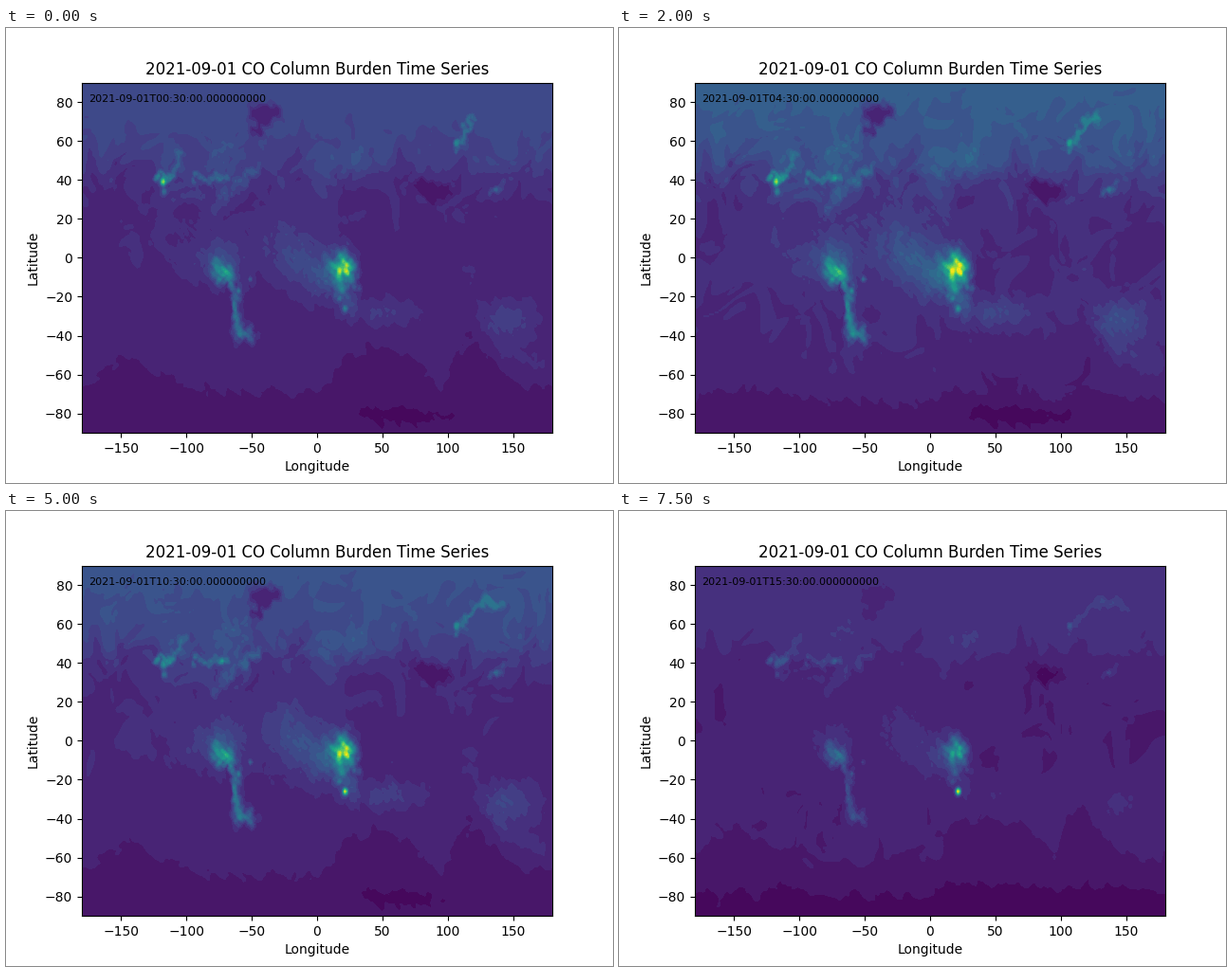
These frames come from a looping animation (640 by 480 pixels, 8000 ms). A matplotlib script:

```python
import numpy as np
import matplotlib.pyplot as plt
from matplotlib.animation import FuncAnimation

HOURS = 16
BANDS = 25
X, Y = np.meshgrid(np.linspace(-180, 180, 289), np.linspace(-90, 90, 181))


def waves(x, y, seed, n, lo, hi):
    """Sum of n random plane waves, periodic in longitude, unit variance."""
    rng = np.random.default_rng(seed)
    out = np.zeros_like(x)
    for _ in range(n):
        k = rng.integers(lo, hi + 1)
        m = rng.uniform(-1.5, 1.5) * hi
        out += np.cos(np.radians(k * x + m * y) + rng.uniform(0, 2 * np.pi))
    return out / np.sqrt(n / 2)


def swirl(x, y, seed):
    u = x + 8 * waves(x, y, seed, 6, 2, 8)
    v = y + 5 * waves(x, y, seed + 1, 6, 2, 8)
    return 0.75 * waves(u, v, seed + 2, 8, 3, 12) + 0.4 * waves(u, v, seed + 3, 9, 10, 28)


# Ragged coordinates give plumes an uneven outline
PX = X + 1.3 * waves(X, Y, 11, 8, 8, 30) + 0.5 * waves(X, Y, 12, 8, 30, 70)
PY = Y + 1.0 * waves(X, Y, 13, 8, 8, 30) + 0.5 * waves(X, Y, 14, 8, 30, 70)
GRAIN = waves(X, Y, 15, 10, 20, 70)


def blob(x, y, sx, sy, amp=1.0, power=2, gx=PX, gy=PY):
    r2 = ((gx - x) / sx) ** 2 + ((gy - y) / sy) ** 2
    return amp * np.exp(-r2 ** (power / 2))


def spot(x, y, size, amp):
    return blob(x, y, size, size, amp, gx=X, gy=Y)


def streak(points, width, amp):
    dist = np.full_like(X, 1e9)
    for (x0, y0), (x1, y1) in zip(points, points[1:]):
        dx, dy = x1 - x0, y1 - y0
        s = np.clip(((PX - x0) * dx + (PY - y0) * dy) / (dx * dx + dy * dy), 0, 1)
        dist = np.minimum(dist, np.hypot(PX - x0 - s * dx, PY - y0 - s * dy))
    return amp * np.exp(-(dist / width) ** 2)


def ease(v):
    return 1 / (1 + np.exp(-np.clip(v, -40, 40)))


# Clean southern air lies poleward of this line
FRONT = [(-180, -63), (-148, -50), (-130, -57), (-85, -68), (-20, -70), (5, -68),
         (20, -52), (45, -42), (70, -48), (88, -63), (95, -68), (103, -50),
         (116, -34), (128, -42), (145, -62), (160, -66), (180, -63)]

HAZE = [(-75, 12, 65, 26, .7), (-25, 5, 22, 18, .8), (20, 20, 45, 14, .45),
        (-72, -2, 15, 11, 2.4), (-95, -3, 14, 9, .6), (-70, 45, 35, 11, 1.0),
        (-110, 45, 14, 9, 1.0), (8, 47, 12, 6, 1.3), (30, 50, 9, 7, 2.0),
        (50, -28, 28, 7, 1.5), (148, -33, 20, 11, 1.7), (143, -29, 9, 5, .7),
        (105, 25, 14, 10, .5), (140, 50, 20, 9, .6)]

AFRICA = [(5, -8, 20, 12, 3), (-18, 3, 15, 12, 1.3), (18, -6, 10, 8.5, 6.5),
          (22, -5, 6, 6, 4.5), (18, -16, 4, 5, 4), (22, -6, 1.9, 1.9, 4),
          (25, -24, 7, 6, 2)]


def africa_fires():
    rng = np.random.default_rng(4)
    out = 0
    for _ in range(22):
        out = out + spot(rng.normal(20, 5.5), rng.normal(-7, 4.5), 1.4, rng.uniform(1.5, 4))
    return out


def steady_field():
    lons, lats = zip(*FRONT)
    d = PY - np.interp(X, lons, lats)
    v = 2 + np.where(d > 0, .48 * np.tanh(d / 8), .28 * np.tanh(d / 12))
    v += np.interp(PY, [15, 28, 40, 52, 64, 80, 90], [0, .15, .8, 1.9, 2.7, 3.0, 3.1])
    v -= .45 * ease((-74 - PY + 2 * np.sin(np.radians(3 * X))) / 2)
    v -= blob(68, -80.5, 48, 5.5, .55)

    plume = sum(blob(*h) for h in HAZE)
    plume += (sum(blob(*a) for a in AFRICA) + africa_fires()) * ease((33 - PX) / 1.2)
    plume += blob(-70, -9, 6, 4.5, 5)
    plume += streak([(-77, -3), (-70, -10), (-63, -18), (-62, -28), (-60, -38), (-51, -40)], 4, 4.2)
    plume += streak([(-62, -24), (-62, -36), (-57, -39)], 2.5, 2)
    plume += streak([(118, -8), (123, -22), (135, -42), (152, -50), (172, -56)], 5, .6)
    plume += streak([(-95, 41), (-70, 41)], 1.6, 3)
    plume += streak([(-123, 41), (-112, 42)], 1.6, 3.5)
    plume += streak([(-78, 25), (-66, 35), (-47, 45)], 2.6, 1.6)
    plume += streak([(132, 33), (142, 36)], 1.8, 2)
    v += plume * (1 + .09 * GRAIN)
    for x, y, size, amp in [(-122, 41, 1.6, 5), (-117, 34, 1.5, 5), (-60, -17, 1.3, 4),
                            (-51, -11, 1.1, 4), (137, 35, 1.3, 3), (107, 59, 1.6, 4),
                            (17, -21, 1.2, 4), (-59, -38, 2, 2)]:
        v += spot(x, y, size, amp)
    return v


STEADY = steady_field()
ROUGH = np.interp(Y, [-90, -40, -5, 20, 36, 48, 62, 75, 90],
                  [.05, .09, .16, .22, .5, .55, .38, .16, .05])
GREENLAND = np.maximum(blob(-40, 74, 13, 6.5, 1, 5), streak([(-44, 73), (-46, 65)], 4, 1))
TIBET = np.maximum(blob(90, 34, 14, 5.5, 1, 5), streak([(74, 38), (84, 36)], 3, .9))
ANDES = streak([(-70, -14), (-67, -20), (-67, -30), (-71, -40), (-72, -50)], 1.7, 1)

# Contour band reached by each anchor value, hour by hour
ANCHORS = [.8, 1.3, 1.8, 2.5, 5.4, 20]
KEY_HOURS = [0, 2, 4, 8, 10, 12, 13, 15]
KEY_BANDS = np.array([[.8, 1.3, 1.8, 2.5, 5.4, 20],
                      [.55, .95, 1.75, 2.4, 4.9, 17],
                      [.6, 1.4, 2.1, 2.95, 7.0, 24],
                      [.7, 1.5, 2.2, 3.15, 7.1, 24],
                      [.8, 1.35, 1.8, 2.6, 6.0, 21],
                      [1.0, 1.3, 1.7, 2.4, 4.5, 14.5],
                      [1.0, 1.3, 1.7, 2.4, 4.5, 14],
                      [.5, .9, 1.4, 2.15, 3.6, 13]])


def to_bands(v, t):
    row = [np.interp(t, KEY_HOURS, col) for col in KEY_BANDS.T]
    slope = (row[-1] - row[-2]) / (ANCHORS[-1] - ANCHORS[-2])
    bands = np.interp(v, ANCHORS + [60], row + [row[-1] + 40 * slope])
    return np.clip(bands, .01, BANDS - .01)


def field(t):
    v = STEADY + ROUGH * swirl(X - .4 * t, Y, 30)
    v += spot(-118, 39, 1.6, np.interp(t, [0, 2, 4, 8, 13, 15], [17, 18, 14, 6, 8, 5]))
    v += spot(-73, 41, 1.5, np.interp(t, [0, 4, 8, 10, 15], [1, 4, 9, 6, 6]))
    v += spot(21.5, -26, 1.5, np.interp(t, [0, 8, 10, 13, 15], [6, 5, 18, 33, 35]))
    v += streak([(-116, 41), (-108 + .2 * t, 45), (-106 + .3 * t, 54)], 2.2, 2.8)
    v += streak([(-80 + .2 * t, 55), (-66 + .2 * t, 58)], 2, 1.6)
    v += streak([(-60 + .3 * t, 41), (-45 + .3 * t, 47)], 2, 1)
    siberia = [(106, 58), (112, 60), (115 + .6 * t, 67 + .2 * t),
               (117.5 + 1.2 * t, 72), (119 + 2.1 * t, 72 - .25 * t)]
    v += streak(siberia, 1.8, np.interp(t, [0, 8, 15], [3.6, 4, 2.2]))
    for mask, level in ((GREENLAND, 2.4), (TIBET, 1.3), (ANDES, 2.3)):
        v += (level - v) * np.clip(mask, 0, 1)
    return to_bands(v, t)


fig, ax = plt.subplots(figsize=(6.4, 4.8), dpi=100)
ax.set_xlim(-180, 180)
ax.set_ylim(-90, 90)
ax.set_title("2021-09-01 CO Column Burden Time Series")
ax.set_xlabel("Longitude")
ax.set_ylabel("Latitude")
stamp = ax.text(-175, 80, "", fontsize=8)


def draw(hour):
    for layer in list(ax.collections):
        layer.remove()
    ax.contourf(X, Y, field(hour), levels=np.arange(BANDS + 1), cmap="viridis")
    stamp.set_text(f"2021-09-01T{hour:02d}:30:00.000000000")
    return []


anim = FuncAnimation(fig, draw, frames=HOURS, interval=500, repeat=True, repeat_delay=0)
plt.show()
```
